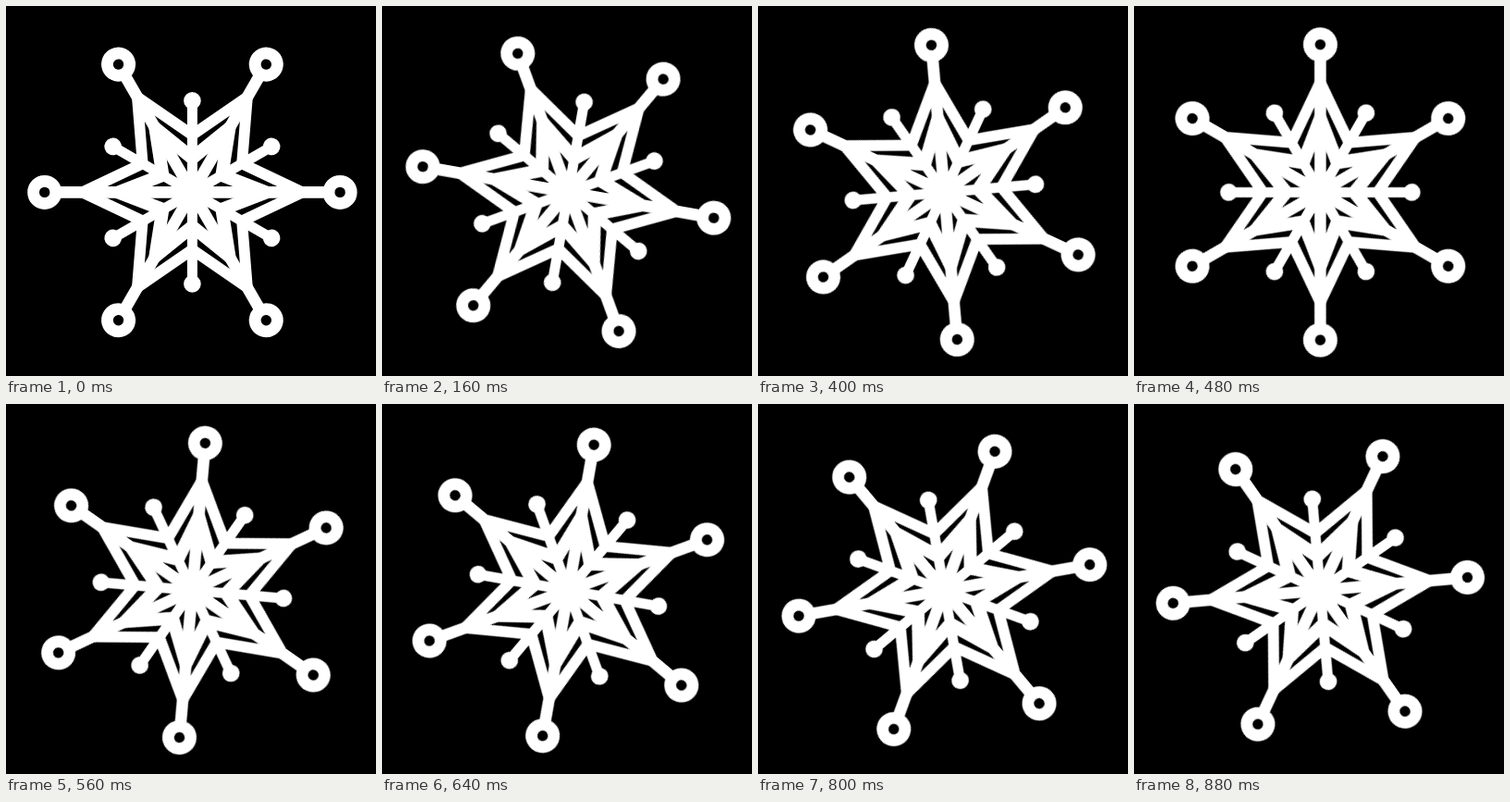
Recreate the animation shown at these times as an HTML page. Size 400 px wide and 400 px high, loop 960 ms.

```html
<!DOCTYPE html>
<html lang="en">
<head>
<meta charset="utf-8">
<title>Snowflake</title>
<style>
  html, body { margin: 0; width: 100%; height: 100%; overflow: hidden; background: #000; }
  svg { display: block; width: 100vw; height: 100vh; }
  .flake {
    fill: none; stroke: #fff; stroke-width: 11;
    transform-origin: 201.4px 201.4px;
    animation: turn 960ms steps(12) infinite;
  }
  @keyframes turn { to { transform: rotate(60deg); } }
</style>
</head>
<body>
<svg viewBox="0 0 400 400">
  <defs>
    <g id="arm">
      <path d="M0 0H148" stroke-width="12.6"/>
      <circle cx="159.7" r="12.1" stroke-width="12.8"/>
      <path d="M53.7 -31L119 0L53.7 31" stroke-width="11.8" stroke-linejoin="bevel"/>
      <path d="M32 -18.5L80 0L32 18.5" stroke-width="14"/>
      <g transform="rotate(30)">
        <path d="M0 0H100"/>
        <circle cx="99" r="9.3" fill="#fff" stroke="none"/>
      </g>
    </g>
  </defs>
  <g class="flake">
    <g transform="translate(201.4 201.4)">
      <use href="#arm"/>
      <use href="#arm" transform="rotate(60)"/>
      <use href="#arm" transform="rotate(120)"/>
      <use href="#arm" transform="rotate(180)"/>
      <use href="#arm" transform="rotate(240)"/>
      <use href="#arm" transform="rotate(300)"/>
    </g>
  </g>
</svg>
</body>
</html>
```
